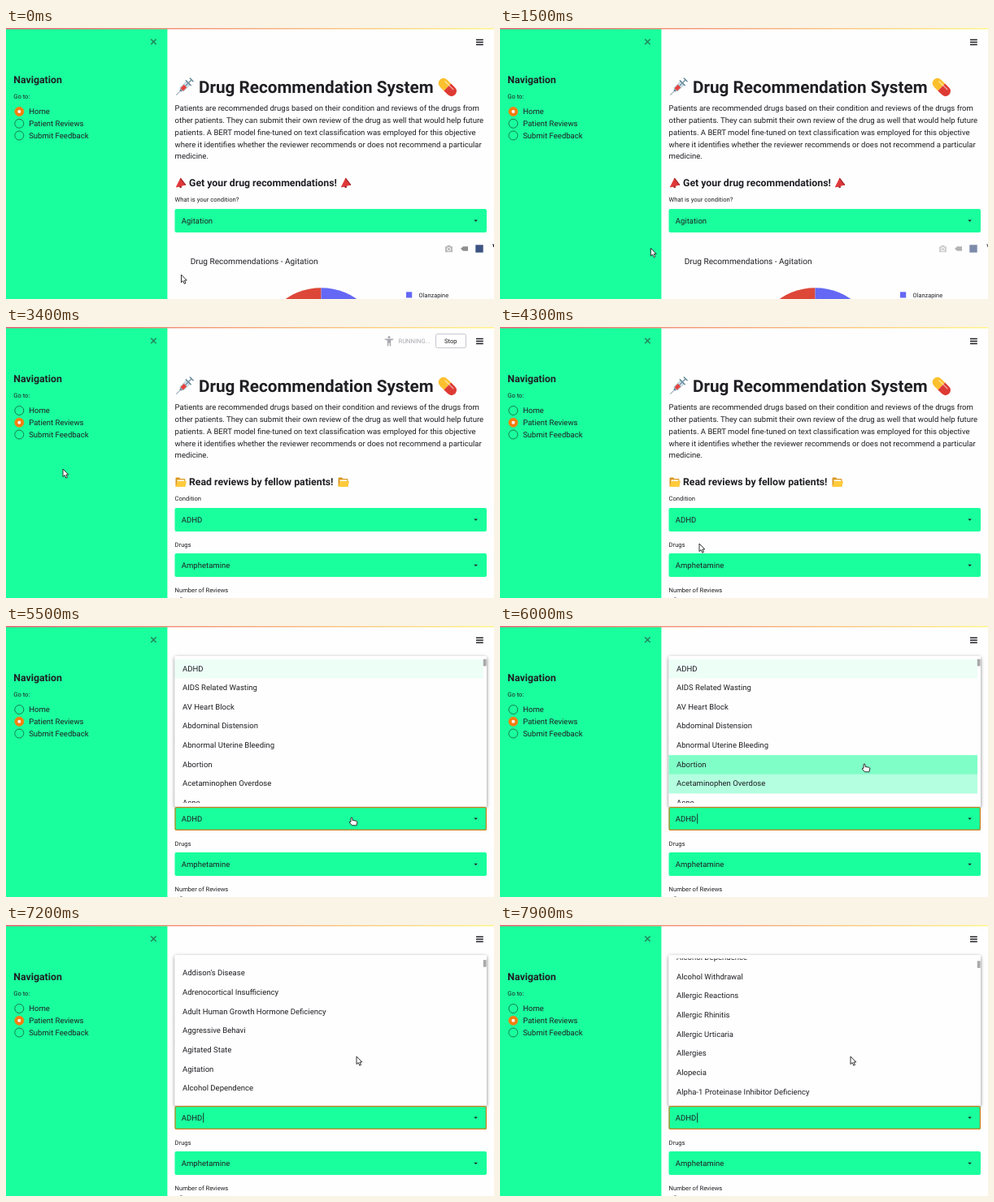
These frames come from a looping animation (600 px wide and 334 px high, 8 s). An HTML page:

```html
<!DOCTYPE html>
<html lang="en">
<head>
<meta charset="utf-8">
<title>Drug Recommendation System</title>
<style>
html, body { margin: 0; width: 100%; height: 100%; overflow: hidden; background: #fefefe; }
svg { display: block; width: 100%; height: 100%; }
text { font: 9.54px Roboto, sans-serif; fill: #1f1f24; text-rendering: geometricPrecision; white-space: pre; }
.title { font-size: 20.7px; font-weight: 700; }
.head { font-size: 12.3px; font-weight: 700; }
.small { font-size: 7.6px; }
.chart { font-size: 10.1px; }
.legend { font-size: 7.4px; }
.green { fill: #1aff9d; }
</style>
</head>
<body>
<svg id="stage" viewBox="0 0 600 334" preserveAspectRatio="xMidYMid meet">
  <defs>
    <linearGradient id="bar"><stop stop-color="#ee6175"/><stop offset="1" stop-color="#fff48a"/></linearGradient>
    <filter id="shadow" x="-5%" y="-8%" width="110%" height="118%">
      <feDropShadow dx="0" dy="1.5" stdDeviation="2.2" flood-opacity=".5"/>
    </filter>
    <clipPath id="view"><rect x="207" y="41.3" width="380" height="176.7"/></clipPath>
    <g id="horn">
      <path d="M4 10.5 7 9.3 8.3 12.4 6.2 13.2Z" fill="#8f2a2a"/>
      <path d="M1.4 12 6.6 1.6 12.3 9.2Z" fill="#e0383a" stroke="#e0383a" stroke-linejoin="round"/>
      <path d="M6.6 1.4 12.5 9.2" stroke="#a3232a" stroke-width="1.3" stroke-linecap="round"/>
    </g>
    <g id="folder">
      <path d="M.5 12V2.2Q.5 1 1.7 1H5l1.4 1.6h5q1 0 1 1V12Z" fill="#d9961f"/>
      <path d="M2.5 3.7h8.8v5H2.5Z" fill="#fff6dc"/>
      <path d="M3 5.6h11L12.2 12.4H.6Z" fill="#ffca3c"/>
    </g>
    <path id="caret" d="M-2.3-1H2.3L0 1.3Z" fill="#1f1f24"/>
  </defs>

  <rect width="600" height="334" fill="#fefefe"/>

  <g id="intro">
    <g transform="translate(209.3 82.7) rotate(-45) scale(.88)">
      <path d="M0 0H10" stroke="#8fa3ad" stroke-width="1.1"/>
      <path d="M8-1.6h3v3.2H8Z" fill="#5d7f91"/>
      <rect x="10.5" y="-3.4" width="13" height="6.8" rx="1" fill="#d3e6ee" stroke="#8aa9b8" stroke-width=".7"/>
      <rect x="11" y="-2.7" width="7" height="5.4" fill="#e5423e"/>
      <path d="M24-4.8V4.8M30.3-3V3" stroke="#5d8296" stroke-width="1.6" stroke-linecap="round"/>
      <path d="M18 0H30" stroke="#7897a6" stroke-width="1.8"/>
    </g>
    <text class="title" x="237" y="80.3">Drug Recommendation System</text>
    <g transform="translate(542.8 73) rotate(45)">
      <path d="M0-6.2H-7A6.2 6.2 0 0 0-7 6.2H0Z" fill="#fcc02e"/>
      <path d="M0-6.2H7A6.2 6.2 0 0 1 7 6.2H0Z" fill="#de3a34"/>
      <path d="M-7-3H7" stroke="#fff" stroke-opacity=".5" stroke-width="1.5" stroke-linecap="round"/>
    </g>
    <g id="about"></g>
  </g>

  <g id="home">
    <use href="#horn" x="208" y="184"/><use href="#horn" x="411" y="184"/>
    <text class="head" x="225" y="195.3">Get your drug recommendations!</text>
    <text class="small" x="207.6" y="214">What is your condition?</text>
    <rect class="green" x="207.5" y="223" width="383.5" height="29" rx="2"/>
    <text x="215.8" y="240.9">Agitation</text>
    <use href="#caret" x="577.6" y="237.5"/>
    <g id="tools">
      <path d="M540 269.3h2l1-1.6h3l1 1.6h2v7h-9Z" fill="#b9b9b9"/>
      <circle cx="544.5" cy="272.6" r="2.1" fill="#b9b9b9" stroke="#fefefe"/>
      <path d="M559 272 562 269.2H568V274.8H562Z" fill="#8f8f8f"/>
      <rect x="577.3" y="267.3" width="9.4" height="9.4" fill="#3d5382"/>
      <path d="M598 267H600M599.6 267V270" stroke="#1f1f24" stroke-width="1.2"/>
    </g>
    <text class="chart" x="226.7" y="290.8">Drug Recommendations - Agitation</text>
    <path d="M387.5 320.2A77 77 0 0 0 310.5 397.2H387.5Z" fill="#dd4738"/>
    <path d="M387.5 320.2A77 77 0 0 1 464.5 397.2H387.5Z" fill="#6468f4"/>
    <rect x="492" y="325.3" width="7.2" height="7.2" fill="#6468f4"/>
    <text class="legend" x="507.5" y="331.8">Olanzapine</text>
  </g>

  <g id="reviews">
    <use href="#folder" x="208" y="184.5"/><use href="#folder" x="408" y="184.5"/>
    <text class="head" x="225" y="195.3">Read reviews by fellow patients!</text>
    <text class="small" x="207.6" y="214">Condition</text>
    <text class="small" x="207.6" y="271">Drugs</text>
    <rect class="green" x="207.5" y="279" width="383.5" height="29" rx="2"/>
    <text x="215.8" y="297">Amphetamine</text>
    <use href="#caret" x="577.6" y="293.8"/>
    <text class="small" x="207.6" y="327">Number of Reviews</text>
    <text class="small" x="213" y="338.5">5</text>
    <rect id="list" x="207.5" y="37" width="383.5" height="185.5" rx="2" fill="#fefefe" filter="url(#shadow)"/>
    <rect class="green" x="207.5" y="223" width="383.5" height="29" rx="2"/>
    <rect id="focus" x="208.1" y="223.6" width="382.3" height="27.8" rx="2" fill="none" stroke="#c8801c" stroke-width="1.2"/>
    <text x="215.8" y="240.9">ADHD</text>
    <path id="blink" d="M242.7 231.5V243.5" stroke="#1f1f24" stroke-width=".9"/>
    <use href="#caret" x="577.6" y="237.5"/>
    <g id="menu">
      <g clip-path="url(#view)"><g id="rows"></g></g>
      <rect id="thumb" x="586.8" y="40.8" width="3.8" height="8.8" rx="1" fill="#a9a9a9"/>
    </g>
  </g>

  <rect class="green" width="198.4" height="334"/>
  <path d="M178.2 13.8l6.4 6.4M184.6 13.8l-6.4 6.4" stroke="#23865c" stroke-width="1.6"/>
  <text class="head" x="9.3" y="68.3">Navigation</text>
  <text class="small" x="9.3" y="87">Go to:</text>
  <g id="nav"></g>
  <circle id="glow" cx="16.3" cy="117.8" r="5.9" fill="none" stroke="#8f8a55" stroke-width="1.6"/>

  <g id="running">
    <g fill="#a8a8b0">
      <circle cx="471" cy="12.4" r="1.5"/>
      <path d="M465.8 14.4H476.2V15.8L473.2 16.4V23.4H471.7V19.8H470.3V23.4H468.8V16.4L465.8 15.8Z"/>
    </g>
    <text class="small" x="482.5" y="20.3" style="fill:#a8a8b0">RUNNING...</text>
    <rect x="528.5" y="8.7" width="37" height="17" rx="2" fill="none" stroke="#b8b8c0" stroke-width=".8"/>
    <text class="small" x="539" y="19.8" font-weight="500">Stop</text>
  </g>
  <path d="M578 14.5h8.8M578 17.5h8.8M578 20.5h8.8" stroke="#1f1f24" stroke-width="1.4"/>
  <rect width="600" height="1.5" fill="url(#bar)"/>

  <g id="cursor" stroke="#1b1b1b" stroke-width=".9" stroke-linejoin="round" fill="#fff">
    <path id="arrow" d="M0 0V9.6L2.2 7.6 3.8 11.2 5.5 10.4 3.9 7H6.8Z"/>
    <path id="hand" d="M-1 .6Q0-.8 1 .6V3.4L5.8 4.3Q7 4.6 6.8 6L6 9.8H.4L-2.8 6Q-2.9 4.6-1 5.4Z"/>
  </g>
</svg>
<script>
const LOOP = 8000, STEP = 100, ROW = 23.66;
const CLICK = 2500, SWAP = 3300, DONE = 3700, OPEN = 5200, SCROLL = 6250;

const about = [
  "Patients are recommended drugs based on their condition and reviews of the drugs from",
  "other patients. They can submit their own review of the drug as well that would help future",
  "patients. A BERT model fine-tuned on text classification was employed for this objective",
  "where it identifies whether the reviewer recommends or does not recommend a particular",
  "medicine."
];
const conditions = [
  "ADHD", "AIDS Related Wasting", "AV Heart Block", "Abdominal Distension",
  "Abnormal Uterine Bleeding", "Abortion", "Acetaminophen Overdose", "Acne",
  "Actinic Keratosis", "Acute Coronary Syndrome", "Acute Lymphoblastic Leukemia",
  "Acute Nonlymphocytic Leukemia", "Acute Promyelocytic Leukemia", "Addison's Disease",
  "Adrenocortical Insufficiency", "Adult Human Growth Hormone Deficiency", "Aggressive Behavi",
  "Agitated State", "Agitation", "Alcohol Dependence", "Alcohol Withdrawal",
  "Allergic Reactions", "Allergic Rhinitis", "Allergic Urticaria", "Allergies",
  "Alopecia", "Alpha-1 Proteinase Inhibitor Deficiency"
];
const pages = ["Home", "Patient Reviews", "Submit Feedback"];

// [time, x, y]
const mouse = [
  [1300, 215.5, 304], [2000, 110, 190], [2450, 12.5, 119], [3000, 12.5, 119],
  [3400, 70, 175], [3800, 195, 250], [4200, 245, 267], [4700, 245, 267],
  [5100, 340, 240], [5500, 425, 236], [5900, 447, 182], [6000, 448, 170], [6250, 431, 162]
];
// [time, offset]
const scroll = [[SCROLL, 0], [6700, 145], [7200, 300.6], [7900, 462]];

const $ = id => document.getElementById(id);
const clamp = v => Math.max(0, Math.min(1, v));
const show = (id, on) => $(id).style.display = on ? "" : "none";
const fade = (id, v) => $(id).setAttribute("opacity", clamp(v));

function add(parent, tag, attrs, text = "") {
  const el = document.createElementNS("http://www.w3.org/2000/svg", tag);
  for (const k in attrs) el.setAttribute(k, attrs[k]);
  el.textContent = text;
  return parent.appendChild(el);
}

function track(keys, t, i) {
  if (t <= keys[0][0]) return keys[0][i];
  for (let k = 1; k < keys.length; k++) {
    const a = keys[k - 1], b = keys[k];
    if (t <= b[0]) return a[i] + (b[i] - a[i]) * (t - a[0]) / (b[0] - a[0]);
  }
  return keys[keys.length - 1][i];
}

about.forEach((s, i) => add($("about"), "text", { x: 207.6, y: 102.3 + i * 14.75 }, s));

const backs = conditions.map((s, i) => {
  const back = add($("rows"), "rect", { class: "green", x: 207.5, y: 40.8 + i * ROW, width: 379.5, height: ROW });
  add($("rows"), "text", { x: 217, y: 55.5 + i * ROW }, s);
  return back;
});

const radios = pages.map((s, i) => {
  const y = 103 + i * 14.75;
  const ring = add($("nav"), "circle", { cx: 16.3, cy: y, r: 5.5 });
  const dot = add($("nav"), "circle", { cx: 16.3, cy: y, r: 2, fill: "#fff" });
  add($("nav"), "text", { x: 28.2, y: y + 3.4 }, s);
  return { ring, dot };
});

function draw(t) {
  const page = t < CLICK ? 0 : 1;
  radios.forEach(({ ring, dot }, i) => {
    const on = i === page;
    ring.setAttribute("fill", on ? "#f57c10" : "#1aff9d");
    ring.setAttribute("stroke", on ? "#e58a1c" : "#157a50");
    dot.style.display = on ? "" : "none";
  });
  fade("glow", t < CLICK ? 0 : (3200 - t) / 600);

  show("home", t < SWAP);
  show("reviews", t >= SWAP);
  fade("tools", (1700 - t) / 300);
  fade("running", t < DONE ? (t - 2550) / 600 : 0);

  const open = t >= OPEN;
  for (const id of ["list", "menu", "focus"]) show(id, open);
  show("blink", open && Math.floor((t - 5550) / 800) % 2 === 0);

  const top = track(scroll, t, 1);
  $("rows").setAttribute("transform", `translate(0 ${-top})`);
  $("thumb").setAttribute("y", 40.8 + top * .0075);
  const tint = { 0: .07 };
  if (t >= 5900 && t < SCROLL + STEP) tint[5] = clamp(.55 + (t - 6000) / 500);
  if (t >= 5800) tint[6] = clamp(.33 - (t - 6000) / 500);
  backs.forEach((b, i) => b.setAttribute("opacity", tint[i] || 0));

  const x = track(mouse, t, 1), y = track(mouse, t, 2);
  const overNav = x < 100 && y > 96 && y < 140;
  const overField = t > 4900 && t < SCROLL && (y < 252 && y > 223 || open);
  $("cursor").setAttribute("transform", `translate(${x} ${y})`);
  show("hand", overNav || overField);
  show("arrow", !(overNav || overField));
}

const start = performance.now();
function tick() {
  const t = (performance.now() - start) % LOOP;
  draw(Math.floor(t / STEP) * STEP);
  requestAnimationFrame(tick);
}
draw(0);
requestAnimationFrame(tick);
</script>
</body>
</html>
```
